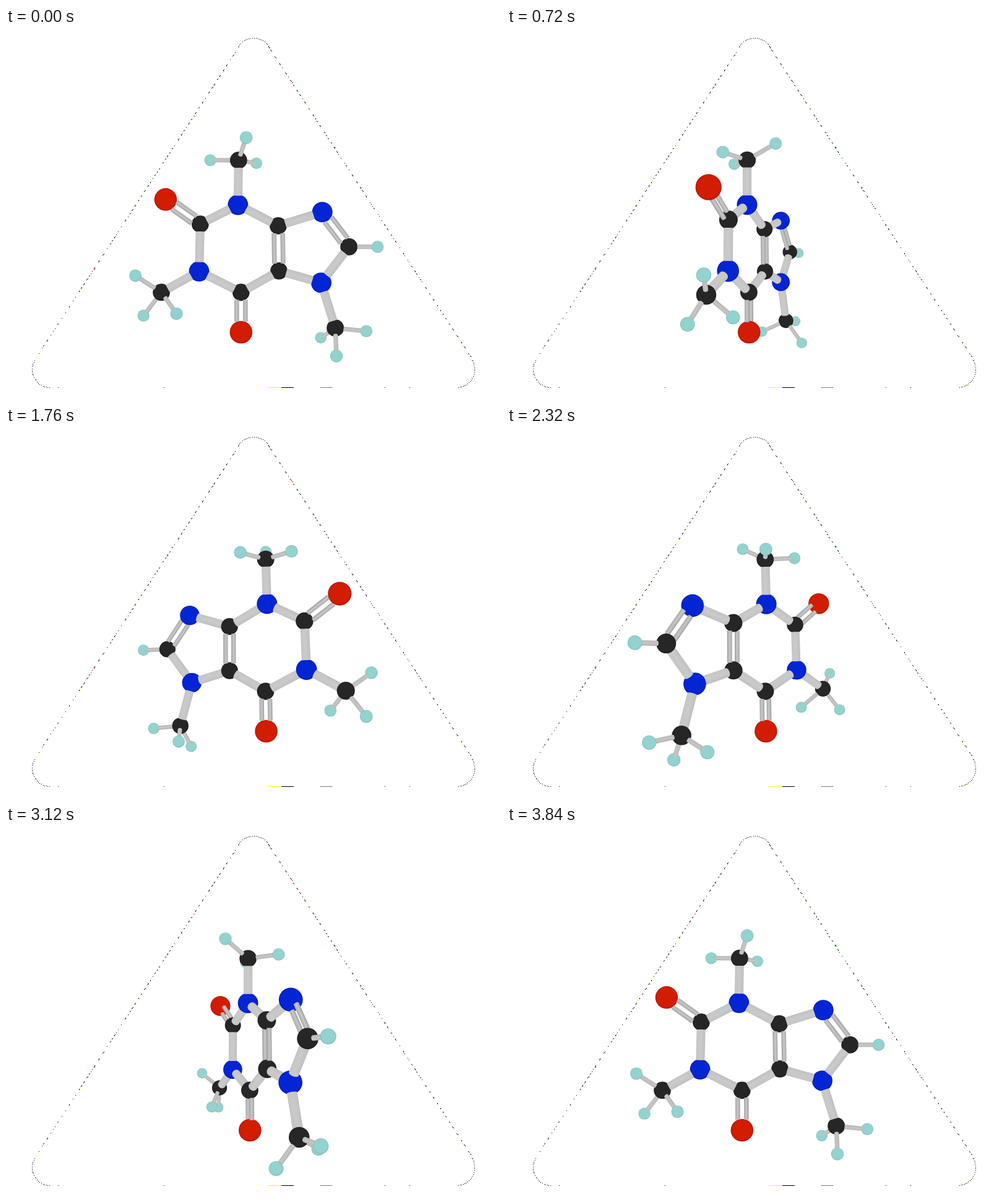
Write an HTML page with a canvas that moves like this. It is 800 by 600 pixels and loops after 3920 ms.

```html
<!DOCTYPE html>
<html lang="en">
<head>
<meta charset="utf-8">
<title>Rotating molecule</title>
<style>
  html, body { margin: 0; width: 100%; height: 100%; overflow: hidden; background: #fff; }
  canvas { display: block; width: 800px; height: 600px; }
</style>
</head>
<body>
<canvas id="stage" width="800" height="600"></canvas>
<script>
const ctx = document.getElementById('stage').getContext('2d');
const STEP = 80, STEPS = 49, TURN = 48, DEPTH = 800, MID_Y = 400, ROLL = 0.0087;
const rad = Math.PI / 180;

const KINDS = {
  C: { r: 13.9, core: '#262626', rim: '#1e1e1e' },
  N: { r: 16.5, core: '#0425d4', rim: '#021eb8' },
  O: { r: 18.3, core: '#d21d02', rim: '#b41902' },
  H: { r: 9.8, core: '#93d2ce', rim: '#80bdb9' }
};

// kind, x, y and z relative to the turning axis
const atoms = {
  a: ['C', -1.6, -186, 0], b: ['N', -3.2, -114, 0], c: ['C', -64.5, -83.5, 0],
  d: ['O', -120.3, -124, 0], e: ['N', -67, -7, 0], f: ['C', 0.5, 27.5, 0],
  g: ['O', 0, 92, 0], h: ['C', 62, -6.5, 0], i: ['C', 61.5, -79.5, 0],
  j: ['N', 132.7, -100.8, 0], k: ['C', 175, -44.5, 0], l: ['H', 221, -44, 0],
  m: ['N', 130, 13.1, 0], n: ['C', 152, 86.3, 0], o: ['C', -128.5, 26.4, 0],
  p: ['H', 10.9, -210, 45], q: ['H', -48.6, -191, -18], r: ['H', 28, -190, -40],
  s: ['H', -166, -1, 20], t: ['H', -160, 64.8, -10], u: ['H', -100.4, 59.2, 26.5],
  v: ['H', 202, 91.8, -1], w: ['H', 134.7, 107, -42], x: ['H', 147.6, 126, 33]
};
const single = 'ab bc bi ce ef eo fh hm ij km mn'.split(' ');
const double = 'cd fg hi jk'.split(' ');
const thin = 'kl ap aq ar os ot ou nv nw nx'.split(' ');

// Each rod keeps its two end points, trimmed to the sphere surfaces
function makeRod(pair, half, offset, tones) {
  const [A, B] = [...pair].map(id => atoms[id]);
  const d = [1, 2, 3].map(i => B[i] - A[i]);
  const len = Math.hypot(...d);
  const u = d.map(v => v / len);
  const flat = Math.hypot(u[0], u[1]);
  const side = [-u[1] / flat * offset, u[0] / flat * offset, 0];
  const end = (atom, sign) => {
    const cut = Math.max(Math.abs(offset), half);
    const inset = Math.sqrt(KINDS[atom[0]].r ** 2 - cut ** 2) * sign;
    return u.map((v, i) => atom[i + 1] + side[i] + v * inset);
  };
  return { from: end(A, 1), to: end(B, -1), half, tones };
}

const LIGHT = ['#c0c0c0', '#cacaca', '#c5c5c5'];
const SHADED = ['#a0a0a0', '#c8c8c8', '#a8a8a8'];
const SLIM = ['#b4b4b4', '#c6c6c6', '#bababa'];
const rods = [
  ...single.map(p => makeRod(p, 7.1, 0, LIGHT)),
  ...double.flatMap(p => [-7, 7].map(o => makeRod(p, 3.8, o, SHADED))),
  ...thin.map(p => makeRod(p, 3.6, 0, SLIM))
];

function makeView(n) {
  const base = n * 360 / TURN;
  const sway = 0.8 + 3.4 * Math.sin(base * rad) + 1.2 * Math.sin(2 * base * rad);
  const angle = (base - sway) * rad;
  const axis = 400.8 - 21 * Math.cos((base - 4.5) * rad);
  const c = Math.cos(angle), s = Math.sin(angle);
  return ([x, y, z]) => {
    const depth = z * c - x * s;
    const scale = DEPTH / (DEPTH - depth);
    const across = (x * c + z * s) * scale;
    return {
      x: axis + across + (y - 92) * ROLL,
      y: MID_Y + y * scale - across * ROLL,
      z: depth, scale
    };
  };
}

function drawBall(p, kind) {
  const r = kind.r * p.scale;
  const g = ctx.createRadialGradient(p.x, p.y - r * 0.15, r * 0.5, p.x, p.y, r);
  g.addColorStop(0, kind.core);
  g.addColorStop(0.7, kind.core);
  g.addColorStop(1, kind.rim);
  ctx.fillStyle = g;
  ctx.beginPath();
  ctx.arc(p.x, p.y, r, 0, 2 * Math.PI);
  ctx.fill();
}

function drawRod(a, b, half, tones) {
  const dx = b.x - a.x, dy = b.y - a.y, len = Math.hypot(dx, dy);
  const tip = Math.abs(b.z - a.z) / Math.hypot(len, b.z - a.z);
  const ha = half * a.scale, hb = half * b.scale, h = (ha + hb) / 2;
  ctx.save();
  ctx.translate(a.x, a.y);
  ctx.rotate(Math.atan2(dy, dx));
  const g = ctx.createLinearGradient(0, -h, 0, h);
  tones.forEach((tone, i) => g.addColorStop(i / 2, tone));
  ctx.fillStyle = g;
  ctx.beginPath();
  ctx.ellipse(0, 0, ha * tip, ha, 0, Math.PI / 2, Math.PI * 1.5);
  ctx.ellipse(len, 0, hb * tip, hb, 0, -Math.PI / 2, Math.PI / 2);
  ctx.closePath();
  ctx.fill();
  ctx.restore();
}

// Sparse dotted outline of a rounded triangle
function makeOutline() {
  const layer = document.createElement('canvas');
  layer.width = 800;
  layer.height = 600;
  const c = layer.getContext('2d');
  let seed = 7;
  const random = () => (seed = seed * 16807 % 2147483647) / 2147483647;
  const dot = (x, y, color = '#000', w = 1) => {
    c.fillStyle = color;
    c.fillRect(Math.round(x), Math.round(y), w, 1);
  };
  for (const side of [-1, 1]) {
    let y = 30;
    while (y < 533) {
      const run = 1 + Math.floor(random() * 3);
      for (let i = 0; i < run; i++, y++) dot(400 + side * (24 + (y - 30) * 0.652), y);
      y += 2 + Math.floor(random() * 7);
    }
  }
  const arc = (x, y, r, from, to) => {
    for (let a = from; a < to; a += 3.5 + random() * 4) {
      dot(x + r * Math.cos(a * rad), y + r * Math.sin(a * rad));
    }
  };
  arc(400, 45, 29, 212, 328);
  arc(71, 552, 29, 92, 212);
  arc(728, 552, 29, -32, 88);
  dot(423, 581, '#ff0', 22);
  dot(445, 581, '#000', 20);
  for (let x = 508; x < 528; x += 2) dot(x, 581);
  for (const x of [84, 255, 612, 652]) dot(x, 581);
  const tint = (color, spots) => spots.forEach(([x, y]) => dot(x, y, color, 2));
  tint('#ff0', [[484, 121], [273, 187], [234, 247], [212, 282], [119, 425], [736, 513], [48, 533], [745, 577]]);
  tint('#f30', [[303, 142], [462, 88], [142, 390]]);
  tint('#0f0', [[531, 193]]);
  return layer;
}
const outline = makeOutline();

function draw(n) {
  const view = makeView(n);
  const parts = Object.values(atoms).map(([kind, ...pos]) => {
    const p = view(pos);
    return { z: p.z, paint: () => drawBall(p, KINDS[kind]) };
  });
  for (const rod of rods) {
    const a = view(rod.from), b = view(rod.to);
    parts.push({ z: (a.z + b.z) / 2 + 4, paint: () => drawRod(a, b, rod.half, rod.tones) });
  }
  parts.sort((a, b) => a.z - b.z);
  ctx.fillStyle = '#fff';
  ctx.fillRect(0, 0, 800, 600);
  ctx.drawImage(outline, 0, 0);
  parts.forEach(part => part.paint());
}

const start = performance.now();
let shown = -1;
function tick() {
  const n = Math.floor((performance.now() - start) / STEP) % STEPS;
  if (n !== shown) draw(shown = n);
  requestAnimationFrame(tick);
}
tick();
</script>
</body>
</html>
```
